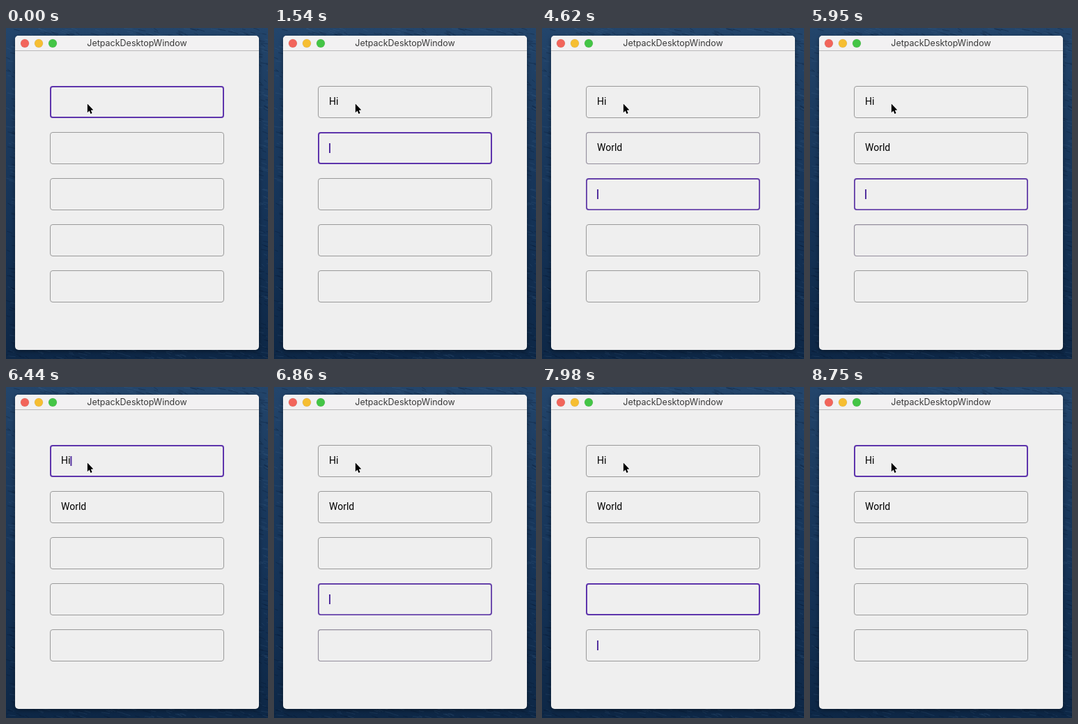
An HTML page with a canvas for the animation above (8.96 s loop, 376 by 474 pixels).

```html
<!DOCTYPE html>
<html lang="en">
<head>
<meta charset="utf-8">
<title>JetpackDesktopWindow</title>
<style>
  html, body { margin: 0; width: 376px; height: 474px; overflow: hidden; background: #12304f; }
  body { position: relative; }
  canvas { position: absolute; left: 0; top: 0; display: block; }
  div { position: absolute; white-space: pre; line-height: 16px; }
  #title { left: 13px; top: 14px; width: 350px; text-align: center; color: #3a3a3a; font: 12.5px/16px Inter, sans-serif; }
  .value { left: 79px; color: #000; font: 14px/16px Roboto, sans-serif; }
  #first { top: 97px; }
  #second { top: 163px; }
</style>
</head>
<body>
<canvas id="stage" width="376" height="474"></canvas>
<div id="title">JetpackDesktopWindow</div>
<div id="first" class="value"></div>
<div id="second" class="value"></div>
<script>
const LOOP = 8960, STEP = 70, FADE = 160;
const W = 376, H = 474;
const canvas = document.getElementById('stage');
const ctx = canvas.getContext('2d');
const values = [document.getElementById('first'), document.getElementById('second')];

const GREY = [154, 154, 154], PURPLE = [94, 53, 172];

// [time, focused field]
const focusMoves = [
  [-1000, 0], [1330, 1], [4480, 2], [4760, 3],
  [5810, 2], [6020, 1], [6230, 0], [6510, 4], [6720, 3], [6930, 2], [7140, 1],
  [7490, 2], [7770, 3], [7980, 4], [8190, 0]
];
const caretHidden = [[0, 210], [1050, 1330], [2030, 2450], [3500, 4130], [5320, 5740], [8680, LOOP]];
const typing = [
  { text: 'Hi', keys: [490, 560] },
  { text: 'World', keys: [2450, 2940, 3010, 3080, 3150] }
];

const fieldTop = i => 83 + 66 * i;
const typed = (entry, t) => entry.text.slice(0, entry.keys.filter(k => k <= t).length);

function random(seed) {
  return () => (seed = (seed * 16807) % 2147483647) / 2147483647;
}

function roundRect(c, x, y, w, h, r) {
  c.beginPath();
  c.roundRect(x, y, w, h, r);
}

function drawWater(c) {
  const g = c.createLinearGradient(0, 0, 0, H);
  g.addColorStop(0, '#23456b');
  g.addColorStop(0.25, '#1b3b60');
  g.addColorStop(0.6, '#143256');
  g.addColorStop(1, '#0d2746');
  c.fillStyle = g;
  c.fillRect(0, 0, W, H);
  const rnd = random(77);
  c.lineWidth = 1;
  for (let i = 0; i < 2600; i++) {
    const x = rnd() * W, y = rnd() * H, len = 4 + rnd() * 9;
    c.strokeStyle = rnd() < 0.5 ? 'rgba(4,18,42,.3)' : 'rgba(82,120,158,.18)';
    c.beginPath();
    c.moveTo(x, y);
    c.quadraticCurveTo(x + len / 2, y + 1, x + len, y + 1 + rnd() * 3);
    c.stroke();
  }
}

function drawWindow(c) {
  c.save();
  c.shadowColor = 'rgba(0,0,0,.4)';
  c.shadowBlur = 6;
  c.shadowOffsetY = 2;
  c.fillStyle = '#efefef';
  roundRect(c, 13, 11, 350, 450, 5);
  c.fill();
  c.restore();
  c.fillStyle = '#f2f1f2';
  roundRect(c, 13, 11, 350, 21, [5, 5, 0, 0]);
  c.fill();
  c.fillStyle = '#b9b9b9';
  c.fillRect(13, 32, 350, 1);
  ['#f2655b', '#f6be32', '#44c546'].forEach((color, i) => {
    c.fillStyle = color;
    c.beginPath();
    c.arc(27 + 20 * i, 22, 6, 0, 7);
    c.fill();
    c.strokeStyle = 'rgba(0,0,0,.12)';
    c.lineWidth = 0.6;
    c.stroke();
  });
}

function drawPointer() {
  ctx.beginPath();
  [[116.8, 108.5], [116.8, 121.2], [119.6, 118.6], [121.5, 123], [123.6, 122.1], [121.8, 117.8], [125.4, 117.6]]
    .forEach(p => ctx.lineTo(...p));
  ctx.closePath();
  ctx.lineJoin = 'round';
  ctx.strokeStyle = '#fff';
  ctx.lineWidth = 1.6;
  ctx.stroke();
  ctx.fillStyle = '#000';
  ctx.fill();
}

function drawField(i, amount) {
  const line = 1 + amount;
  const color = GREY.map((v, k) => Math.round(v + (PURPLE[k] - v) * amount));
  ctx.strokeStyle = `rgb(${color})`;
  ctx.lineWidth = line;
  roundRect(ctx, 63 + line / 2, fieldTop(i) + line / 2, 250 - line, 46 - line, 4 - line / 2);
  ctx.stroke();
}

// Border highlight of every field, 0 to 1
function highlights(t) {
  const level = [0, 0, 0, 0, 0];
  focusMoves.forEach(([start, field], n) => {
    if (start > t) return;
    const p = Math.min(1, (t - start) / FADE);
    level.fill(0);
    level[field] = p;
    if (n) level[focusMoves[n - 1][1]] = 1 - p;
    else level[field] = 1;
  });
  return level;
}

const backdrop = document.createElement('canvas');
backdrop.width = W;
backdrop.height = H;
drawWater(backdrop.getContext('2d'));
drawWindow(backdrop.getContext('2d'));

function render(t) {
  ctx.drawImage(backdrop, 0, 0);
  highlights(t).forEach((amount, i) => drawField(i, amount));

  const texts = typing.map(entry => typed(entry, t));
  values.forEach((el, i) => {
    if (el.textContent !== texts[i]) el.textContent = texts[i];
  });

  if (!caretHidden.some(([a, b]) => t >= a && t < b)) {
    const field = focusMoves.filter(m => m[0] <= t).pop()[1];
    ctx.font = '14px Roboto, sans-serif';
    const x = 79 + ctx.measureText(texts[field] || '').width;
    ctx.fillStyle = '#54329f';
    ctx.fillRect(x, fieldTop(field) + 16, 2, 14);
  }
  drawPointer();
}

const begin = performance.now();
function tick() {
  const t = (performance.now() - begin) % LOOP;
  render(Math.floor(t / STEP) * STEP);
  requestAnimationFrame(tick);
}
render(0);
requestAnimationFrame(tick);
</script>
</body>
</html>
```
